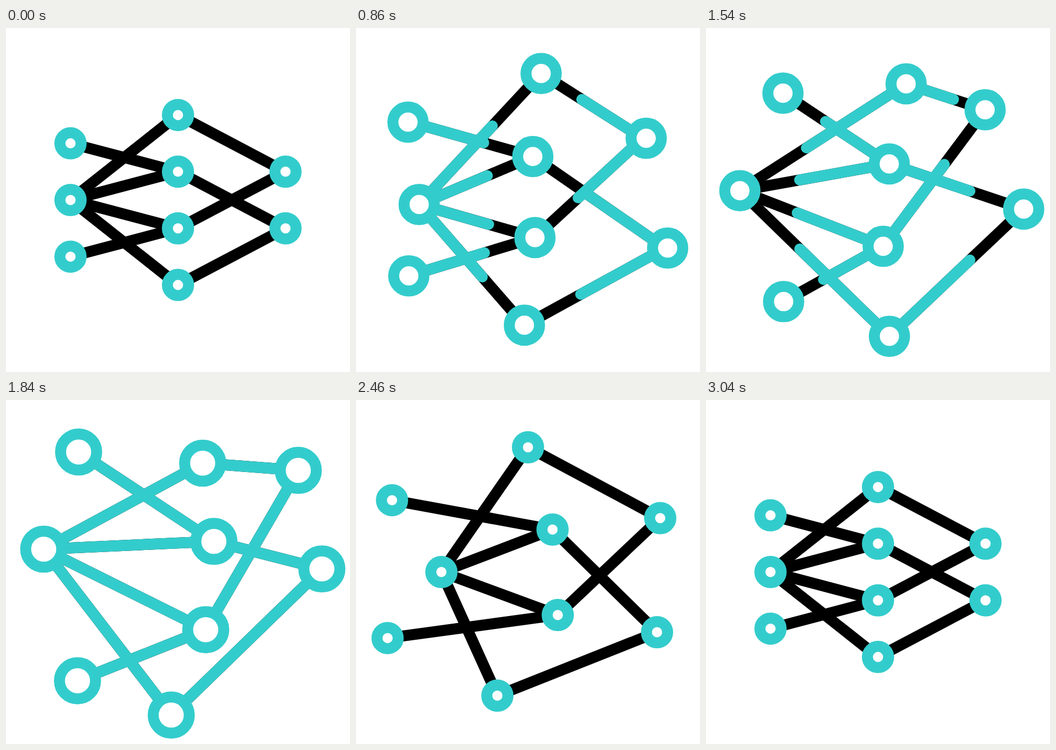
An HTML page that plays this animation: 640x640 px, repeating every 3200 ms.

```html
<!DOCTYPE html>
<html lang="en">
<head>
<meta charset="utf-8">
<title>Network</title>
<style>
  html, body { margin: 0; width: 100%; height: 100%; overflow: hidden; background: #fff; }
  svg { display: block; width: 100%; height: 100%; stroke-width: 20.5; }
  .links { stroke: #000; }
  .pulses { stroke: #3cc; stroke-linecap: round; }
  .nodes { stroke: #3cc; fill: #fff; }
</style>
</head>
<body>
<svg viewBox="0 0 640 640">
  <g class="links"></g>
  <g class="pulses"></g>
  <g class="nodes"></g>
</svg>
<script>
const LOOP = 3200, PHASE = 600, STEP = 20;
const CENTER = 320, COLUMN_GAP = 200, ROW_GAP = 105.4;
const RADIUS = 19.75, SWELL = 14;

// Per node: offsets from rest when spread, swung and lifted;
// lean is how far the ring slides past its links in the first spread
const drift = (spread, swing, lift, lean = 0) => {
  const rest = [0, 0];
  return { stops: [rest, spread, swing, lift, spread, rest], lean };
};
const LAYERS = [
  [
    drift([-54.5, -29], [34, -55], [16, -119], -7),
    drift([40, 0], [-66, 21], [-51, -43]),
    drift([-63, 18], [40, 62], [14, 98])
  ],
  [
    drift([0, -76], [61, -79], [46.5, -44]),
    drift([47, -27], [-48, -30], [67, -4]),
    drift([57, 28], [-53, 1], [51.5, 55]),
    drift([-58.6, 74], [71, 76], [-12, 108.5])
  ],
  [
    drift([47.3, -49], [-37, -82], [23.5, -137.5], 10.6),
    drift([41.2, 61], [75.6, 0.5], [68, -60], 8)
  ]
];

const add = (group, tag) => document.querySelector(group)
  .appendChild(document.createElementNS('http://www.w3.org/2000/svg', tag));
const set = (el, attrs) => {
  for (const name in attrs) el.setAttribute(name, attrs[name].toFixed(2));
};
const mix = (a, b, k) => a + (b - a) * k;
const ease = k => k * k * (3 - 2 * k);

const [left, middle, right] = LAYERS.map((layer, column) =>
  layer.map((node, row) => ({
    ...node,
    homeX: CENTER + (column - 1) * COLUMN_GAP,
    homeY: CENTER + (row - (layer.length - 1) / 2) * ROW_GAP,
    ring: add('.nodes', 'circle')
  })));
const nodes = [...left, ...middle, ...right];

const link = (inner, outer) => ({
  inner, outer, base: add('.links', 'line'), pulse: add('.pulses', 'line')
});
const links = [
  ...middle.map(node => link(node, left[1])),
  link(middle[1], left[0]),
  link(middle[2], left[2]),
  ...middle.map((node, i) => link(node, right[i % 2]))
];

function drawLine(el, a, b, from, to) {
  set(el, {
    x1: mix(a.x, b.x, from), y1: mix(a.y, b.y, from),
    x2: mix(a.x, b.x, to), y2: mix(a.y, b.y, to)
  });
}

function draw(time) {
  const t = Math.min(time, PHASE * 5 - 0.001);
  const phase = Math.floor(t / PHASE);
  const k = ease(t / PHASE - phase);

  // The pulse fills outward from the middle, then empties the same way
  const growing = phase % 2 === 0;
  const resting = phase === 4;
  const head = resting ? 0 : growing ? k : 1;
  const tail = growing ? 0 : k;
  const swell = head - tail;

  for (const node of nodes) {
    const [x0, y0] = node.stops[phase], [x1, y1] = node.stops[phase + 1];
    node.x = node.homeX + mix(x0, x1, k);
    node.y = node.homeY + mix(y0, y1, k);
    const lean = phase < 2 ? node.lean * swell : 0;
    set(node.ring, { cx: node.x + lean, cy: node.y, r: RADIUS + SWELL * swell });
  }
  for (const { inner, outer, base, pulse } of links) {
    drawLine(base, inner, outer, 0, 1);
    drawLine(pulse, inner, outer, tail, head);
  }
}

const start = performance.now();
function tick() {
  const t = (performance.now() - start) % LOOP;
  draw(Math.floor(t / STEP) * STEP);
  requestAnimationFrame(tick);
}
tick();
</script>
</body>
</html>
```
